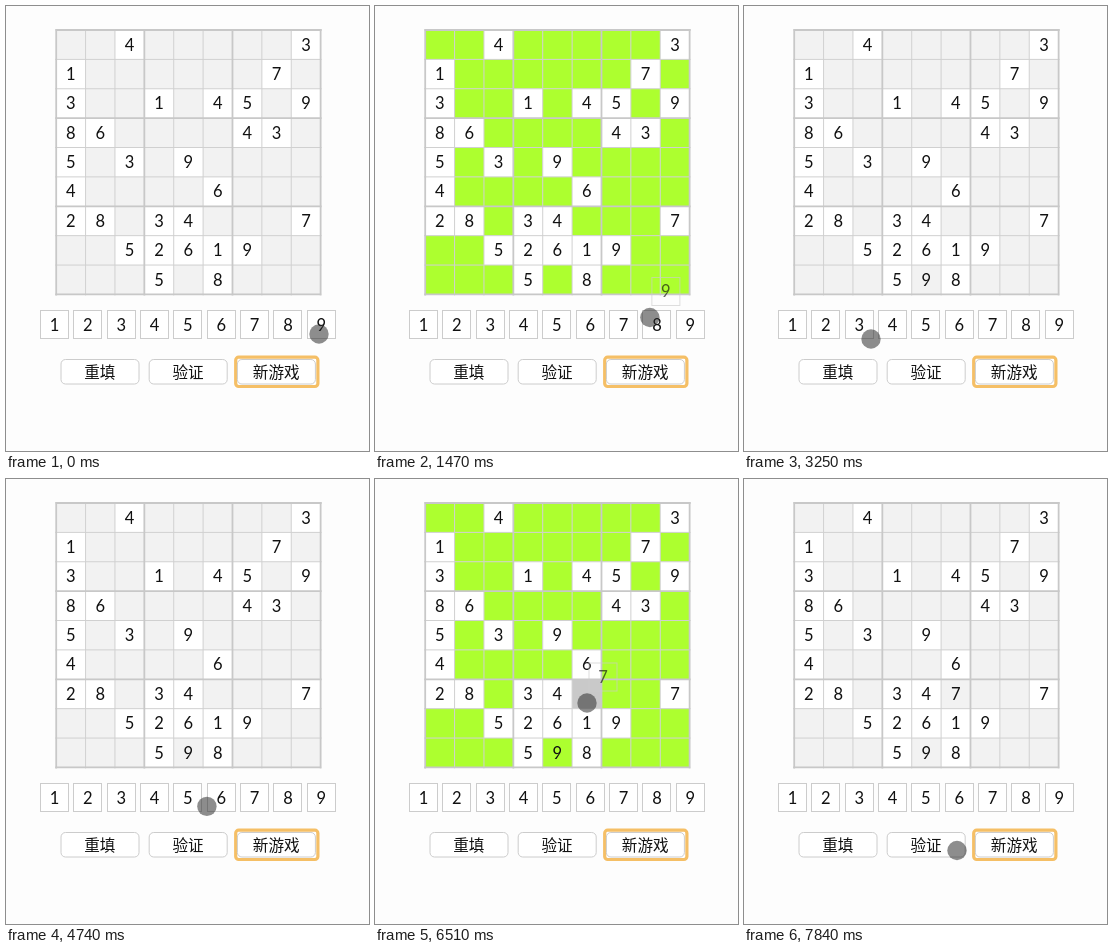
Write an HTML page that moves like this. It is 363 px wide and 445 px high and loops after 7990 ms.

```html
<!DOCTYPE html>
<html lang="zh-CN">
<head>
<meta charset="utf-8">
<title>数独</title>
<style>
  html, body { margin: 0; width: 100%; height: 100%; overflow: hidden; background: #fdfdfd; }
  svg { display: block; width: 363px; height: 445px; }
  text { text-anchor: middle; fill: #111; }
  .digit { font: 16.5px Lato, "Open Sans", sans-serif; }
  .label { font: 15.6px "Noto Sans CJK SC", "Noto Sans CJK", sans-serif; }
  .key, .button { fill: #fff; stroke: #ccc; }
</style>
</head>
<body>
<svg id="stage" viewBox="0 0 363 445"></svg>
<script>
const LOOP = 7990;
const LEFT = 50.2, TOP = 24, CELL = 29.38;
const GREY = '#f2f2f2', GREEN = '#adff2f', HOVER = '#c9c9c9';
const PUZZLE = [
  '..4.....3', '1......7.', '3..1.45.9',
  '86....43.', '5.3.9....', '4....6...',
  '28.34...7', '..52619..', '...5.8...'
];

// Pointer moves: start and end in ms, steps, target, optional control point, ease-out power.
const MOVES = [
  { start: 150, end: 590, steps: 4, to: [188, 273], ease: 1.4 },
  { start: 890, end: 1180, steps: 3, to: [314, 328], ease: 1.4 },
  { start: 1470, end: 2210, steps: 6, to: [186, 274], ease: 2 },
  { start: 2810, end: 3250, steps: 4, to: [127, 333], via: [150, 322], ease: 1.4 },
  { start: 4600, end: 5040, steps: 4, to: [246, 324], ease: 1.4 },
  { start: 5330, end: 6510, steps: 9, to: [212, 224], ease: 2 },
  { start: 7100, end: 7840, steps: 6, to: [213, 371.5], via: [317, 325], ease: 1 }
];
const DRAGS = [
  { digit: 9, press: 1330, lift: 1470, drop: 2360, row: 8, col: 4 },
  { digit: 7, press: 5180, lift: 5330, drop: 6660, row: 6, col: 5 }
];

const stage = document.getElementById('stage');

function add(parent, tag, attrs, text) {
  const node = document.createElementNS('http://www.w3.org/2000/svg', tag);
  for (const name in attrs) node.setAttribute(name, attrs[name]);
  if (text !== undefined) node.textContent = text;
  return parent.appendChild(node);
}

const digit = (parent, x, y, value) => add(parent, 'text', { class: 'digit', x, y: y + 5.9 }, value);
const middle = (origin, i) => origin + (i + 0.5) * CELL;

const cells = [];
PUZZLE.forEach((line, row) => [...line].forEach((char, col) => {
  const given = char !== '.';
  const box = add(stage, 'rect', {
    x: LEFT + col * CELL, y: TOP + row * CELL, width: CELL, height: CELL, fill: given ? '#fff' : GREY
  });
  if (given) digit(stage, middle(LEFT, col), middle(TOP, row), char);
  else cells.push({ box, row, col });
}));

for (const block of [false, true]) {
  for (let i = 0; i <= 9; i++) {
    if ((i % 3 === 0) !== block) continue;
    const x = LEFT + i * CELL, y = TOP + i * CELL, size = 9 * CELL;
    add(stage, 'path', {
      d: `M${x} ${TOP - 1}v${size + 2}M${LEFT - 1} ${y}h${size + 2}`,
      stroke: block ? '#c8c8c8' : '#d0d0d0', 'stroke-width': block ? 1.8 : 1
    });
  }
}

for (let n = 1; n <= 9; n++) {
  const x = 48.8 + (n - 1) * 33.35;
  add(stage, 'rect', { class: 'key', x: Math.round(x - 14) - 0.5, y: 304.5, width: 28, height: 28 });
  digit(stage, x - 0.3, 319, n);
}

['重填', '验证', '新游戏'].forEach((label, i) => {
  const x = 55 + i * 88.2;
  if (i === 2) add(stage, 'rect', {
    x: 229.7, y: 351.2, width: 82.2, height: 29.3, rx: 3, fill: '#fff', stroke: '#f5bf66', 'stroke-width': 3.2
  });
  add(stage, 'rect', { class: 'button', x, y: 353.5, width: 78, height: 24.5, rx: 4.5 });
  add(stage, 'text', { class: 'label', x: x + 38.8, y: 371.7 }, label);
});

for (const drag of DRAGS) {
  drag.filled = digit(stage, middle(LEFT, drag.col), middle(TOP, drag.row), drag.digit);
  drag.ghost = add(stage, 'g', { opacity: 0.65 });
  add(drag.ghost, 'rect', { x: -14, y: -14, width: 28, height: 28, fill: 'none', stroke: '#ccc' });
  digit(drag.ghost, 0, 0, drag.digit);
}
const pointer = add(stage, 'circle', { r: 9.7, fill: '#282828', 'fill-opacity': 0.53 });

function pointerAt(t) {
  let from = [313, 328];
  for (const { start, end, steps, to, via, ease } of MOVES) {
    if (t < start) break;
    const gap = (end - start) / (steps - 1);
    const step = Math.min(steps, Math.floor((t - start) / gap + 0.06) + 1);
    if (step === steps) { from = to; continue; }
    const p = 1 - (1 - step / steps) ** ease, q = 1 - p;
    return from.map((a, i) => {
      const mid = via ? via[i] : (a + to[i]) / 2;
      return q * q * a + 2 * q * p * mid + p * p * to[i];
    });
  }
  return from;
}

const show = (node, on) => node.setAttribute('visibility', on ? 'visible' : 'hidden');

function draw(t) {
  const [x, y] = pointerAt(t);
  const held = DRAGS.find(d => t >= d.press && t < d.drop);
  const lifted = held && t >= held.lift;
  const col = Math.floor((x - LEFT) / CELL), row = Math.floor((y - TOP) / CELL);

  for (const cell of cells) {
    const over = lifted && cell.row === row && cell.col === col;
    cell.box.setAttribute('fill', over ? HOVER : held ? GREEN : GREY);
  }
  for (const drag of DRAGS) {
    show(drag.filled, t >= drag.drop);
    show(drag.ghost, drag === held && lifted);
    drag.ghost.setAttribute('transform', `translate(${x + 16} ${y - 26})`);
  }
  pointer.setAttribute('cx', x);
  pointer.setAttribute('cy', y);
}

const begin = performance.now();
function tick() {
  draw((performance.now() - begin) % LOOP);
  requestAnimationFrame(tick);
}
tick();
</script>
</body>
</html>
```
